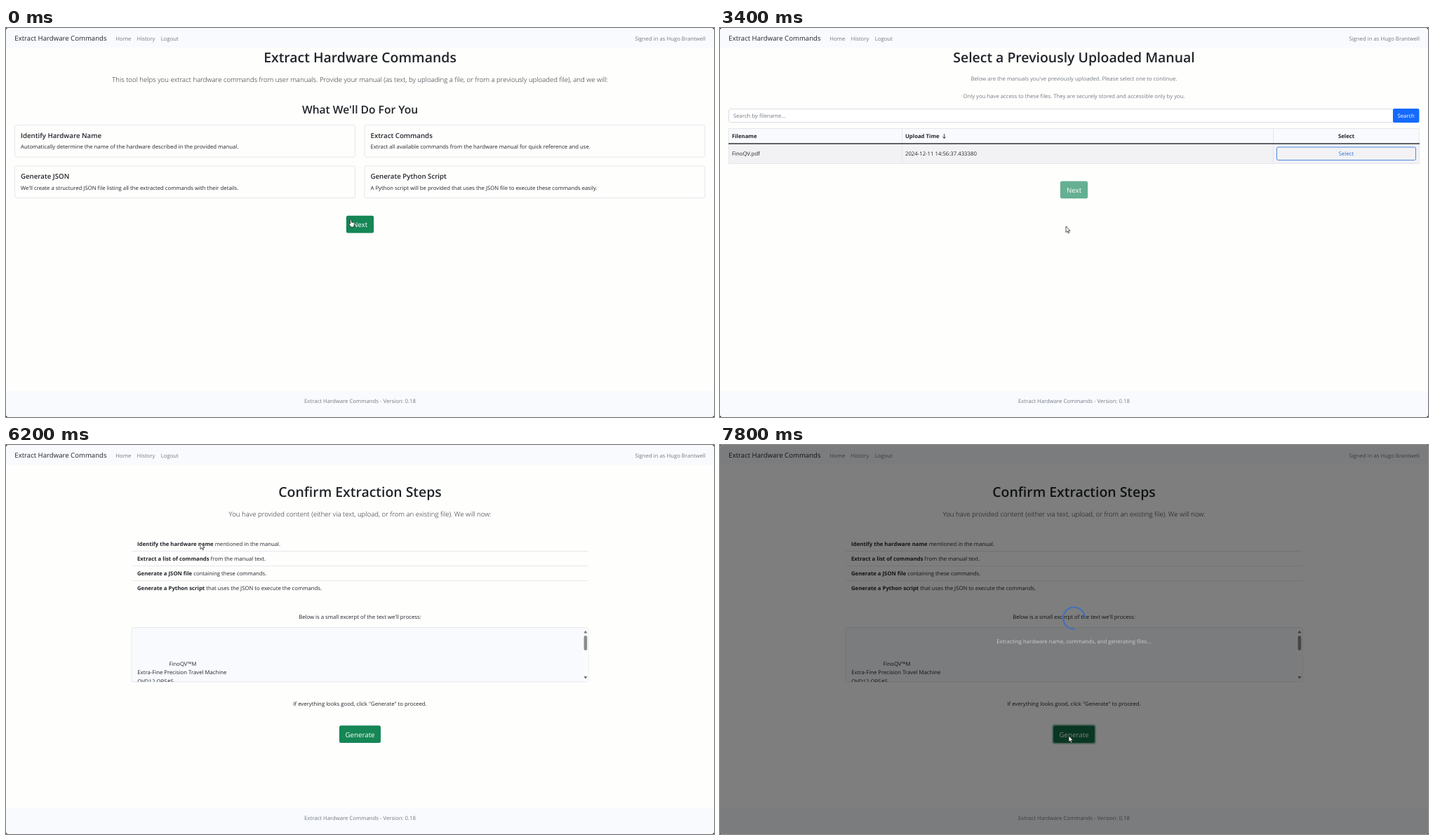
These frames come from a looping animation (1009x555 px, 8 s). An HTML page:

```html
<!DOCTYPE html>
<html lang="en">
<head>
<meta charset="utf-8">
<title>Extract Hardware Commands</title>
<style>
  html, body { margin: 0; width: 100%; height: 100%; overflow: hidden; background: #222; }
  svg { display: block; width: 100%; height: 100%; }
  text {
    font: 7.76px "Open Sans", "Noto Sans", sans-serif; fill: #212529;
    white-space: pre; text-rendering: geometricPrecision;
  }
  .h1 { font-size: 19.45px; font-weight: 600; }
  .h2 { font-size: 15.6px; font-weight: 600; }
  .h5 { font-size: 9.7px; font-weight: 600; }
  .lead { font-size: 9.65px; font-weight: 300; }
  .brand { font-size: 9.62px; }
  .big { font-size: 9.75px; fill: #fff; }
  .bold, tspan { font-weight: 700; }
  .mute { fill: #747b82; }
  .white { fill: #fff; }
  .blue { fill: #2a6fd0; }
  .mid { text-anchor: middle; }
  .end { text-anchor: end; }
</style>
</head>
<body>
<svg id="stage" viewBox="0 0 1009 555"></svg>
<script>
const LOOP = 8000, STEP = 200, MID = 504.5;
const GREEN = '#158655', DARK_GREEN = '#127549', BLUE = '#146afc', LINE = '#e4e7ea', PALE = '#f8fafe';
const stage = document.getElementById('stage');

// Pointer path: time, x, y of the tip
const path = [
  [0, 491, 273], [1200, 491, 273], [1600, 196, 180], [2000, 836, 213], [2400, 836, 213],
  [2800, 500.5, 305], [3000, 493, 283], [3400, 493, 283], [3600, 470, 231], [3800, 480, 97],
  [4000, 64, 178], [4200, 886.5, 175], [4400, 886.5, 175], [4800, 491, 233], [5000, 491, 235.5],
  [5400, 491, 235.5], [5600, 500, 240], [5800, 500, 240], [6000, 500, 67], [6200, 277, 140],
  [6400, 277, 204], [6600, 653, 270], [6800, 560, 426], [7000, 497, 415], [8000, 497, 415]
];

function pointerAt(t) {
  const i = path.findIndex(k => k[0] > t);
  const [a, b] = [path[i - 1], path[i]];
  const p = (t - a[0]) / (b[0] - a[0]);
  return [a[1] + (b[1] - a[1]) * p, a[2] + (b[2] - a[2]) * p];
}

// y is the middle of the capitals
const text = (x, y, s, cls = '') => `<text x="${x}" y="${y}" dy=".36em" class="${cls}">${s}</text>`;
const mid = (y, s, cls = '', x = MID) => text(x, y, s, cls + ' mid');
const box = (x, y, w, h, fill, stroke = 'none', rx = 0, more = '') =>
  `<rect x="${x}" y="${y}" width="${w}" height="${h}" rx="${rx}" fill="${fill}" stroke="${stroke}" ${more}/>`;
const line = (x1, y1, x2, y2, color = LINE, w = 1) =>
  `<path d="M${x1} ${y1}L${x2} ${y2}" stroke="${color}" stroke-width="${w}"/>`;
const card = (x, y, w, h) => box(x + .5, y + .5, w - 1, h - 1, 'none', LINE, 2.5);
const inside = ([x, y], [bx, by, w, h]) => x >= bx && x <= bx + w && y >= by && y <= by + h;
const ring = ([x, y, w, h], color) =>
  box(x - 1, y - 1, w + 2, h + 2, 'none', color, 3, 'stroke-width="2"');
const nextAt = y => [484.9, y, 39.2, 24.8];

function greenButton(r, label, state) {
  const fill = { off: '#65af92', hover: DARK_GREEN, focus: '#126e47' }[state] || GREEN;
  return (state === 'focus' ? ring(r, '#a9cfbe') : '') +
    box(...r, fill, 'none', 2.5) + mid(r[1] + r[3] / 2 + .6, label, 'big');
}

function selectButton(r, state, hoverFill, selectedFill) {
  const [x, y, w, h] = r, cx = x + w / 2, cy = y + h / 2 + .1;
  if (state === 'selected') return box(...r, selectedFill, 'none', 2) + mid(cy, 'Selected', 'white', cx);
  if (state === 'hover') return box(...r, hoverFill, 'none', 2) + mid(cy, 'Select', 'white', cx);
  return box(x + .5, y + .5, w - 1, h - 1, 'none', '#4a88e2', 2) + mid(cy, 'Select', 'blue', cx);
}

function introPage(t, tip) {
  const info = [
    ['Identify Hardware Name', 'Automatically determine the name of the hardware described in the provided manual.'],
    ['Extract Commands', 'Extract all available commands from the hardware manual for quick reference and use.'],
    ['Generate JSON', "We'll create a structured JSON file listing all the extracted commands with their details."],
    ['Generate Python Script', 'A Python script will be provided that uses the JSON file to execute these commands easily.']
  ];
  const next = nextAt(267.8);
  return {
    hand: inside(tip, next),
    art: mid(42, 'Extract Hardware Commands', 'h1') +
      mid(74, 'This tool helps you extract hardware commands from user manuals. Provide your manual (as text, by uploading a file, or from a previously uploaded file), and we will:', 'lead') +
      mid(116.5, "What We'll Do For You", 'h2') +
      info.map(([title, body], i) => {
        const x = i % 2 ? 510.5 : 12, y = i > 1 ? 196.5 : 138;
        return card(x, y, 486, 46.5) + text(x + 9, y + 15.5, title, 'h5') + text(x + 9, y + 31.5, body);
      }).join('') +
      greenButton(next, 'Next', t < 200 ? '' : t < 400 ? 'hover' : 'focus')
  };
}

function methodPage(t, tip) {
  const options = [
    ['Provide Text', ['Manually enter the content of your hardware manual using our editor.']],
    ['Upload Manual', ['Upload a TXT, MD, DOCX, or PDF file containing your manual. Only you have',
      'access to uploaded files, stored securely and linked to your account.']],
    ['Select Existing File', ['Choose a previously uploaded manual from your account history.']]
  ];
  const next = nextAt(274), overNext = inside(tip, next);
  let hand = overNext, art = '';
  options.forEach(([title, lines], i) => {
    const x = 12 + i * 332.4, cx = x + 160;
    const r = [Math.floor(x + 9), Math.round(195.7 + lines.length * 12.4), 303, 20];
    const over = inside(tip, r), picked = i === 2 && t >= 2200;
    hand = hand || over;
    art += card(Math.round(x), 162.5, 320, 86.5) + mid(178, title, 'h5', cx) +
      lines.map((s, n) => mid(194.5 + n * 12.4, s, '', cx)).join('') +
      (picked ? ring(r, '#8db9fb') : '') +
      selectButton(r, picked ? 'selected' : over ? 'hover' : '', BLUE, BLUE);
  });
  return {
    hand,
    art: mid(67, 'How Would You Like to Provide Your Manual?', 'h1') +
      mid(99, "Choose one of the following options to input your manual. You can either write it directly, upload a file, or select one you've previously uploaded.", 'lead') +
      mid(141, 'Select an Input Method', 'h2') + art +
      greenButton(next, 'Next', t >= 3200 ? 'focus' : overNext ? 'hover' : '')
  };
}

function filePage(t, tip) {
  const picked = t >= 4400, colB = picked ? 248.5 : 259.5, colC = picked ? 756 : 788.5;
  const select = [colC + 4.5, 169.5, 992 - colC - 4.5, 19.5], next = nextAt(218.4);
  const overSelect = inside(tip, select), overNext = picked && inside(tip, next);
  const arrowX = colB + 60;
  return {
    hand: overSelect || overNext,
    art: mid(42, 'Select a Previously Uploaded Manual', 'h1') +
      mid(72, "Below are the manuals you've previously uploaded. Please select one to continue.", 'mute') +
      mid(97, 'Only you have access to these files. They are securely stored and accessible only by you.', 'mute') +
      box(12.5, 115.5, 947, 19, '#fff', '#dadee3', 2.5) + text(19, 125.3, 'Search by filename...', 'mute') +
      box(959, 115, 37.5, 20, BLUE, 'none', 2) + mid(125.3, 'Search', 'white', 977.7) +
      box(12.5, 143.5, 984, 21.5, PALE, LINE) + box(12.5, 165, 984, 28.5, '#f2f2f5', LINE) +
      line(colB, 143.5, colB, 193.5) + line(colC, 143.5, colC, 193.5) +
      line(12, 165, 997, 165, '#30343a', 1.3) +
      text(17, 154.3, 'Filename', 'bold') + text(colB + 4.5, 154.3, 'Upload Time', 'bold') +
      `<path d="M${arrowX} 151v6.5m-2.3-2.3l2.3 2.3 2.3-2.3" fill="none" stroke="#333" stroke-width=".9"/>` +
      mid(154.3, 'Select', 'bold', (colC + 996.5) / 2) +
      text(17, 179.3, 'FinoQV.pdf') + text(colB + 4.5, 179.3, '2024-12-11 14:56:37.433380') +
      selectButton(select, picked ? 'selected' : overSelect ? 'hover' : '', '#468afb', '#1267ef') +
      greenButton(next, 'Next', !picked ? 'off' : t >= 5200 ? 'focus' : overNext ? 'hover' : '')
  };
}

function confirmPage(t, tip) {
  const steps = [
    ['Identify the hardware name', ' mentioned in the manual.'],
    ['Extract a list of commands', ' from the manual text.'],
    ['Generate a JSON file', ' containing these commands.'],
    ['Generate a Python script', ' that uses the JSON to execute the commands.']
  ];
  const button = [475, 400.2, 59, 24.8], over = inside(tip, button);
  return {
    hand: over && t < 7600,
    art: mid(67, 'Confirm Extraction Steps', 'h1') +
      mid(99, 'You have provided content (either via text, upload, or from an existing file). We will now:', 'lead') +
      steps.map(([b, s], i) => text(187, 141.3 + i * 21.1, `<tspan>${b}</tspan>${s}`) +
        (i ? line(179, 130.4 + i * 21.1, 830, 130.4 + i * 21.1) : '')).join('') +
      mid(245.7, "Below is a small excerpt of the text we'll process:") +
      box(179, 260.5, 651, 77.5, PALE, LINE, 2.5) +
      '<clipPath id="view"><path d="M179 261h644v77H179z"/></clipPath><g clip-path="url(#view)">' +
      text(232.5, 312.2, 'FinoQV™M') + text(187.3, 324.5, 'Extra-Fine Precision Travel Machine') +
      text(187.3, 336.8, 'QVD12 QRS#5') + '</g>' +
      box(823, 261, 6.5, 76.5, '#fcfcfc') + box(823.6, 272, 4.6, 21, '#8c8c8c', 'none', 2.3) +
      '<path d="M823.4 268.6l2.5-4 2.5 4zM823.4 330l2.5 4 2.5-4z" fill="#777"/>' +
      mid(369.4, 'If everything looks good, click "Generate" to proceed.') +
      greenButton(button, 'Generate', t >= 7600 ? 'focus' : over ? 'hover' : '')
  };
}

function chrome() {
  return box(0, 0, 1009, 555, '#fefefd', 'none', 4) +
    `<path d="M0 28V4q0-4 4-4H1005q4 0 4 4V28zM0 518H1009v33q0 4-4 4H4q-4 0-4-4z" fill="${PALE}"/>` +
    text(12.3, 15, 'Extract Hardware Commands', 'brand') +
    ['Home', 'History', 'Logout'].map((s, i) => text([156.3, 186.5, 220.7][i], 15, s, 'mute')).join('') +
    text(997, 15, 'Signed in as Hugo Brantwell', 'mute end') +
    mid(532.7, 'Extract Hardware Commands - Version: 0.18', 'mute');
}

function overlay(t) {
  const fade = Math.max(0, Math.min(1, (t - 7510) / 290)) / 2;
  const busy = t >= 7800;
  return box(0, 0, 1009, 555, '#000', 'none', 4, `opacity="${fade}"`) + (busy ?
    `<path d="M520 247A15.5 15.5 0 1 0 504.5 262.5" fill="none" stroke="#4070bb" stroke-width="2.1"
      transform="rotate(-4 504.5 247)"/>` +
    `<g opacity=".6">${mid(280.3, 'Extracting hardware name, commands, and generating files...', 'white')}</g>` : '');
}

function pointer([x, y], hand) {
  const d = hand
    ? 'M-.5 6.5V1.1a.9.9 0 0 1 1.8 0V4l3 .7q1.2.3 1.1 1.6L4.9 9.2 4.3 11H.7L-1.9 7.6q-.6-1 .3-1.4z'
    : 'M0 0V8.6L2 6.7 3.3 9.8 4.7 9.2 3.4 6.3H6.1Z';
  return `<path d="${d}" transform="translate(${x} ${y})" fill="#fff" stroke="#222" stroke-width=".75" stroke-linejoin="round"/>`;
}

function draw(t) {
  const tip = pointerAt(t);
  const page = t < 600 ? introPage : t < 3400 ? methodPage : t < 5400 ? filePage : confirmPage;
  const { art, hand } = page(t, tip);
  stage.innerHTML = chrome() + art + overlay(t) + pointer(tip, hand);
}

// The screen refreshes five times a second
let start, shown = -1;
function tick(now) {
  start ??= now;
  const t = Math.floor((now - start) % LOOP / STEP) * STEP;
  if (t !== shown) draw(shown = t);
  requestAnimationFrame(tick);
}
draw(0);
requestAnimationFrame(tick);
</script>
</body>
</html>
```
